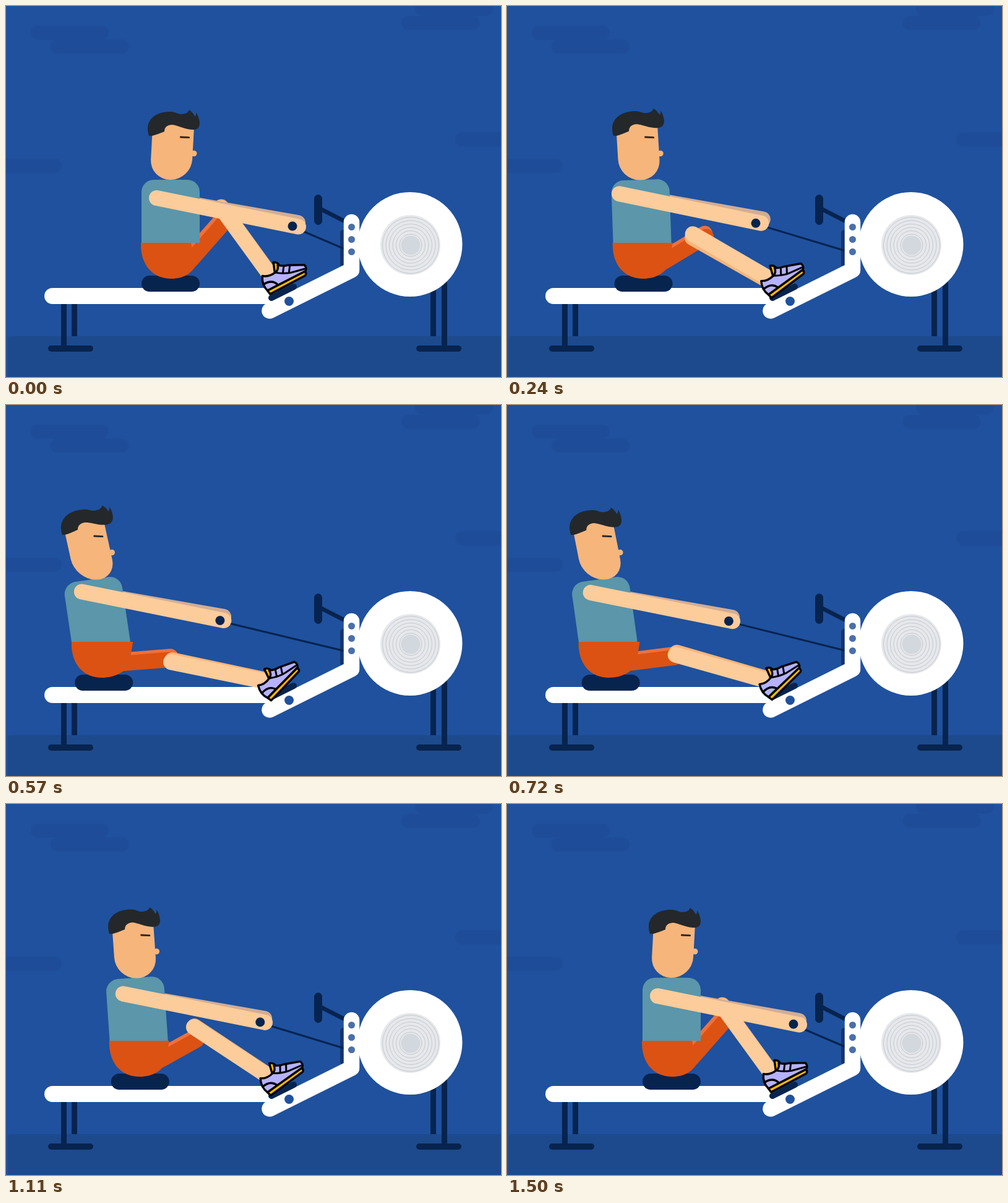
An HTML page with a canvas for the animation above (1.53 s loop, 800 by 600 pixels).

```html
<!DOCTYPE html>
<html lang="en">
<head>
<meta charset="utf-8">
<title>Rowing machine</title>
<style>
  html, body { margin: 0; width: 100%; height: 100%; overflow: hidden; background: #1f519e; }
  canvas { display: block; }
</style>
</head>
<body>
<canvas id="stage" width="800" height="600"></canvas>
<script>
const ctx = document.getElementById('stage').getContext('2d');
const LOOP = 1530, STEP = 30, PULL = 600, END = 1500;
const NAVY = '#07244f', BLUE = '#1f519e', SKIN = '#fccc9a', SHADE = '#f6b57b',
      ORANGE = '#dc5212', LIGHT_ORANGE = '#f0703a', HAIR = '#24282a';

function pill(x, y, w, h, color, r = Math.min(w, h) / 2) {
  ctx.fillStyle = color;
  ctx.beginPath();
  ctx.roundRect(x, y, w, h, r);
  ctx.fill();
}

function disc(x, y, r, color) {
  ctx.fillStyle = color;
  ctx.beginPath();
  ctx.arc(x, y, r, 0, Math.PI * 2);
  ctx.fill();
}

function line(points, width, color) {
  ctx.strokeStyle = color;
  ctx.lineWidth = width;
  ctx.lineCap = ctx.lineJoin = 'round';
  ctx.beginPath();
  points.forEach(p => ctx.lineTo(...p));
  ctx.stroke();
}

function shape(d, fill, stroke, width = 3.4) {
  const path = new Path2D(d);
  if (fill) {
    ctx.fillStyle = fill;
    ctx.fill(path);
  }
  if (stroke) {
    ctx.strokeStyle = stroke;
    ctx.lineWidth = width;
    ctx.lineCap = ctx.lineJoin = 'round';
    ctx.stroke(path);
  }
}

function drawRoom() {
  pill(0, 0, 800, 600, BLUE, 0);
  [[40, 32], [72, 54.5], [639.5, 16], [661, -7], [726, 204.5], [-36, 247]]
    .forEach(([x, y]) => pill(x, y, 126, 22.5, '#1f4c98'));
  pill(3, 534, 820, 90, '#1c4a8d', 4);
}

function drawMachine(hand, cableEnd) {
  [[89, 482, 68], [106, 482, 52], [686, 450, 84], [704, 440, 110]]
    .forEach(([x, y, h]) => pill(x, y, 9, h, NAVY, 0));
  pill(68, 549, 73, 10, NAVY);
  pill(663, 549, 73, 10, NAVY);

  line([[508, 328], [552, 350.5]], 7, NAVY);
  pill(498, 305, 13, 49, NAVY);
  pill(540, 362, 14, 60, '#14346c', 5);
  line([hand, cableEnd], 3, NAVY);

  disc(653, 385.5, 84.5, '#fff');
  disc(653.5, 386.5, 48.5, '#e6e8eb');
  ctx.strokeStyle = '#c3c8cf';
  ctx.lineWidth = 1;
  for (let r = 45.5; r > 16; r -= 5.5) {
    ctx.beginPath();
    ctx.arc(654, 387, r, 0, Math.PI * 2);
    ctx.stroke();
  }
  disc(654, 387, 15.5, '#d3d7de');

  pill(62, 456, 380, 26, '#fff');
  line([[426, 493], [558.5, 427], [558.5, 349.5]], 25.5, '#fff');
  [357.5, 377.5, 397.5].forEach(y => disc(558.5, y, 5.5, '#4a6fab'));
  disc(457.5, 477.5, 7.5, BLUE);
  line([[429, 472], [465, 454]], 10, NAVY);
}

function drawShoe(heel, angle) {
  ctx.save();
  ctx.translate(...heel);
  ctx.rotate(angle);
  shape('M25 -27 L31 -43 Q36 -41 37 -36 L35 -24 Z', '#ffb800', '#000');
  shape('M1 -7 Q-3 -20 5 -32 Q13 -25 26 -27 Q33 -28 35 -36 Q41 -30 49 -28 L73 -16 Q75 -10 70 -6 Z',
    '#b6b2ff', '#000');
  shape('M1 -7 L69 -6 Q70 -1 66 0 L2 0 Z', '#ffb800', '#000');
  shape('M0 -19 Q16 -20 20 -8', null, '#000');
  shape('M27 -26 Q38 -18 48 -15 L70 -10 M43 -30 L36 -20 M52 -26 L45 -16', null, '#000', 3);
  ctx.restore();
}

function drawTorso(x, lean) {
  ctx.save();
  ctx.beginPath();
  ctx.rect(0, 0, 800, 383);
  ctx.clip();
  ctx.translate(x, 383);
  ctx.rotate(-lean);
  pill(-47, -102, 94, 125, '#5b96aa', 20);
  ctx.restore();
}

function drawHead(p, lift) {
  ctx.save();
  ctx.translate(267.5 - 136 * p, 250);
  ctx.transform(1, 0, 0.29 * p - 0.055, 1, 0, 0);
  pill(-33.5, -60, 67, 91 + 1.5 * p, SHADE, [0, 0, 33, 33]);
  ctx.restore();
  disc(303.7 - 139.5 * p, 238.5, 4.8, SHADE);
  line([[282.3 - 147 * p, 212], [295.7 - 147 * p, 212.7]], 2.8, HAIR);

  // The fringe rises towards the front of the head.
  const at = (x, y) => `${x} ${y - lift * (x / 84) ** 1.6} `;
  ctx.save();
  ctx.translate(229 - 147.5 * p, 0);
  shape('M' + at(2, 210) + 'C' + at(0, 204) + at(0, 200) + at(0, 197) +
    'C' + at(1, 180) + at(17, 170) + at(39, 171) +
    'C' + at(47, 172) + at(49, 176) + at(58, 174.5) +
    'Q' + at(65, 173.5) + at(67, 168) + 'Q' + at(73, 172) + at(76.5, 179) +
    'Q' + at(79, 176) + at(78.5, 172) + 'Q' + at(83, 180) + at(84, 189) +
    'C' + at(84, 199) + at(78, 200) + at(72, 200) +
    'C' + at(58, 199) + at(49, 193) + at(39, 192) +
    'Q' + at(27, 193) + at(27, 203) + 'Q' + at(15, 208) + at(7, 210) + 'Z', HAIR);
  ctx.restore();
}

function draw(t) {
  const pulling = t < PULL;
  const p = pulling ? t / PULL : (END - t) / (END - PULL);
  // Linear progress bent by one amount on the pull and another on the return.
  const track = (from, to, bendPull, bendReturn = 0) =>
    from + (to - from) * (p + (pulling ? bendPull : bendReturn) * p * (1 - p));

  const seat = 219 - 113.5 * p;
  const grip = [track(463, 342.4, 0.44), track(356, 348.4, 0.9)];
  const hand = [track(472.5, 348, 0.4), track(357, 348.6, 1.2)];
  const farHand = [track(471.5, 347, 0.28), track(350.5, 342.5, 1.25)];
  const shoulder = [track(243.5, 118.5, 0.4), track(310.5, 302.3, 1.8)];
  const knee = [track(349, 265.7, 0.76, 0.45), track(328, 419.4, 0.2, -0.3)];
  const farKnee = [track(348, 268, 0.85, 0.45), track(325, 414, 0.67, -0.19)];
  const thighEnd = [track(350, 260, -0.35, 0.15), track(353, 416, -0.35, 0.1)];
  const hip = [seat + 80, 411 + 7 * p];
  const heel = [track(425, 427.3, 0.3), track(467, 479.7, 0.35)];
  const footAngle = -track(28, 47, 0.3) * Math.PI / 180;
  const c = Math.cos(footAngle), s = Math.sin(footAngle);
  const ankle = [heel[0] + 16 * c + 31 * s, heel[1] + 16 * s - 31 * c];
  const farAnkle = ankle.map((v, i) => v + (farKnee[i] - knee[i]) * 0.7);
  const raised = ([x, y]) => [x - 3.5 * (1 - p), y - 5];

  drawRoom();
  drawMachine([grip[0], grip[1] + 1], [552, track(395, 399, 1)]);
  pill(seat, 436, 94, 26, NAVY);

  line([raised(hip), raised(thighEnd)], 25, LIGHT_ORANGE);
  const left = seat - 1 - 4.6 * p, right = Math.min(299, seat + 94);
  shape(`M${left} 383 C${left - 1} 420 ${left + 20} 441 ${left + 49} 441
    C${left + 70} 441 ${seat + 80} 432 ${seat + 88} 420 L${right} 383 Z`, ORANGE);
  line([hip, thighEnd], 25, ORANGE);
  line([farKnee, farAnkle], 25, SHADE);
  line([knee, ankle], 25.5, SKIN);
  drawShoe(heel, footAngle);

  line([shoulder, farHand], 25, '#d2ad95');
  drawTorso(266 - 118.5 * p, track(0, 9.2, -0.77) * Math.PI / 180);
  const toss = pulling ? 1 : Math.max(0, 1 - (t - PULL) / 100);
  drawHead(p, (3.5 + 5 * toss) * p);
  line([shoulder, hand], 25, SKIN);
  disc(...grip, 7.5, NAVY);
}

function frame() {
  const now = performance.now() % LOOP;
  draw(Math.floor(now / STEP) * STEP);
  requestAnimationFrame(frame);
}
frame();
</script>
</body>
</html>
```
